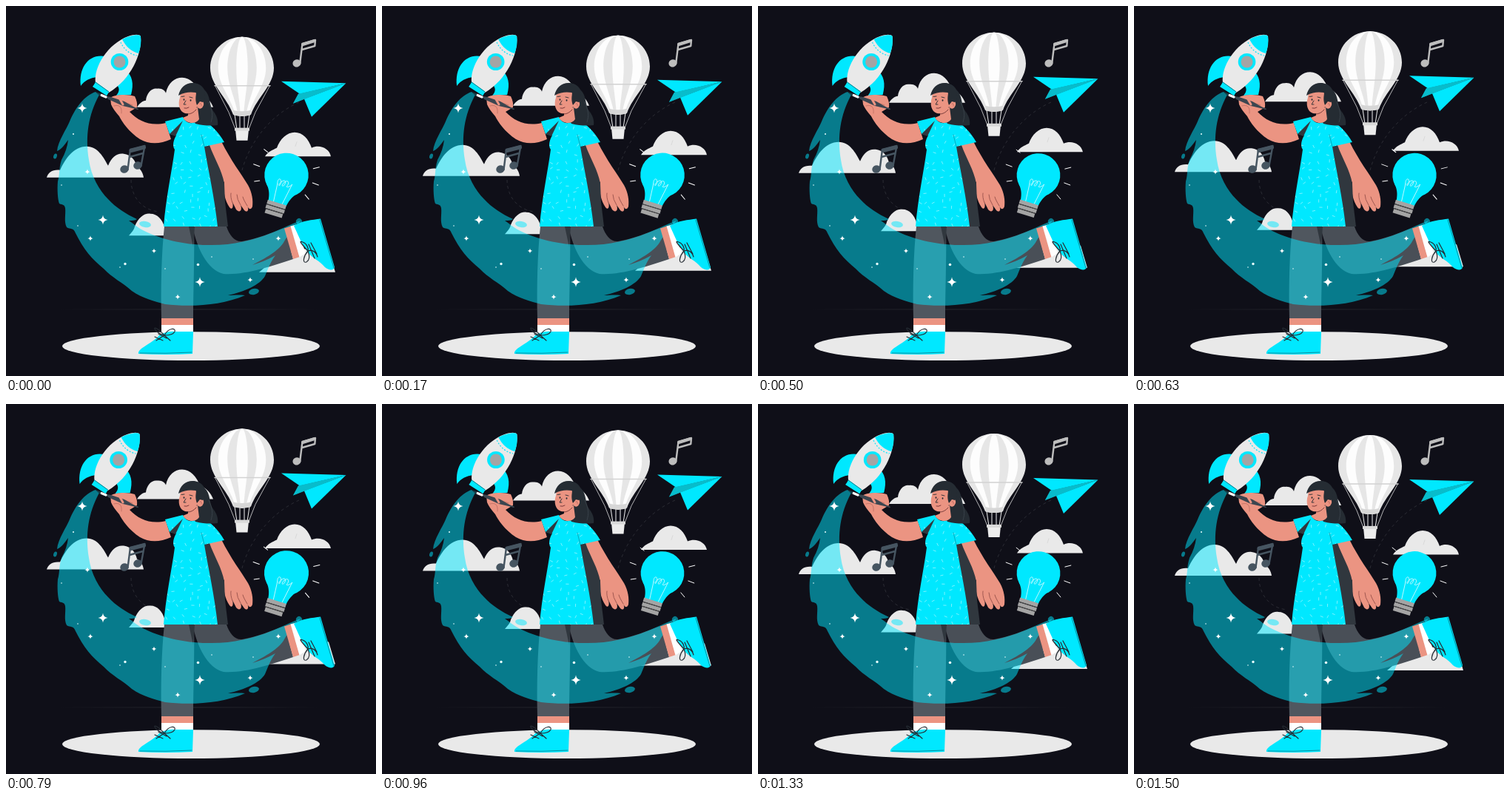
An HTML page with a canvas for the animation above (1.54 s loop, 500x500 px).

```html
<!DOCTYPE html>
<html lang="en">
<head>
<meta charset="utf-8">
<title>Painting a dream</title>
<style>
html, body { margin: 0; width: 100%; height: 100%; overflow: hidden; background: #0f0f18; }
canvas { display: block; width: 100vw; height: 100vh; }
</style>
</head>
<body>
<canvas id="stage" width="500" height="500"></canvas>
<script>
const canvas = document.getElementById('stage');
const ctx = canvas.getContext('2d');
const LOOP = 1540;
const CYAN = '#00e8ff', PALE = '#e9e9e9', SKIN = '#eb9482', INK = '#252c33', SLATE = '#465561', SHADE = '#30373e';

function fill(path, color) {
  ctx.fillStyle = color;
  ctx.fill(new Path2D(path));
}

function line(path, color, width = 1, dash = []) {
  ctx.strokeStyle = color;
  ctx.lineWidth = width;
  ctx.lineCap = dash.length ? 'butt' : 'round';
  ctx.lineJoin = 'round';
  ctx.setLineDash(dash);
  ctx.stroke(new Path2D(path));
}

function oval(x, y, rx, ry, color, angle = 0) {
  ctx.beginPath();
  ctx.ellipse(x, y, rx, ry, angle, 0, Math.PI * 2);
  ctx.fillStyle = color;
  ctx.fill();
}

function shifted(x, y, draw) {
  ctx.save();
  ctx.translate(x, y);
  draw();
  ctx.restore();
}

// Smoothly eased value through [time, value] keys.
function keyed(keys, t) {
  const i = Math.max(1, keys.findIndex(k => k[0] >= t));
  const [t0, a] = keys[i - 1], [t1, b] = keys[i];
  const u = (t - t0) / (t1 - t0);
  return a + (b - a) * u * u * (3 - 2 * u);
}

const rocketSway = [[0, 0], [330, 0.3], [500, -0.4], [760, -1.5], [960, 0.4], [1170, 2], [1500, 0.2], [1540, 0]];
const bulbPulse = [[0, 1.008], [330, 1.012], [500, 0.995], [790, 1.02], [960, 0.995], [1170, 0.995], [1500, 0.998], [1540, 1.008]];

let seed = 11;
function random() {
  seed = (seed * 16807) % 2147483647;
  return seed / 2147483647;
}
const flecks = [];
for (let y = 162; y < 298; y += 11) {
  for (let x = 214; x < 292; x += 11) {
    flecks.push([x + random() * 7, y + random() * 7, random() * Math.PI]);
  }
}

function backdrop() {
  ctx.fillStyle = '#0f0f18';
  ctx.fillRect(0, 0, 500, 500);
  const glow = ctx.createLinearGradient(70, 0, 425, 0);
  glow.addColorStop(0, '#0f0f18');
  glow.addColorStop(0.5, '#292a31');
  glow.addColorStop(1, '#0f0f18');
  ctx.fillStyle = glow;
  ctx.fillRect(70, 409.5, 355, 1);
  oval(250, 459.6, 174, 19.4, PALE);
  line('M319 222C328 188 354 149 396 130', '#2b2c34', 1, [4, 4]);
  line('M169 235C169 257 183 276 207 278', '#2b2c34', 1, [4, 4]);
}

function clouds() {
  fill('M177 137C180 132 185 128 189 128C190 118 197 111 204 112C211 111 215 115 216 118C219 104 228 97 238 97C249 97 258 107 262 119C270 121 277 129 280 137Z', PALE);
  fill('M55 232C57 225 63 221 73 222C80 207 91 190 109 190C124 190 132 205 138 216C143 204 150 199 159 200C169 201 175 209 177 218C182 220 185 226 186 232Z', PALE);
  fill('M166 310.5C172 304 173 302 174 298C179 286 187 280 195 281C205 281 211 289 214 298L219 310.5Z', PALE);
  fill('M342 360C350 353 357 348 365 343L390 328L436 330L445 360Z', PALE);
}

function rightCloud() {
  fill('M350 203.5C354 197 360 195 366 192C370 180 380 171 390 171C401 171 409 180 413 192C424 187 437 193 439 203.5Z', PALE);
  line('M391 190L393 184', '#d5d5d5', 0.8);
}

function balloon() {
  const envelope = 'M0 0C24 0 43 19 43 42C43 65 20 82 12 105Q0 109 -12 105C-20 82 -43 65 -43 42C-43 19 -24 0 0 0Z';
  shifted(319, 42, () => {
    [[1, '#e6e6e6'], [0.75, '#fdfdfd'], [0.46, '#e6e6e6'], [0.18, '#fdfdfd']].forEach(([sx, color]) => {
      ctx.save();
      ctx.scale(sx, 1);
      fill(envelope, color);
      ctx.restore();
    });
    line('M-37 66H38', '#d2d2d2', 1.5);
    line('M-36 67L-18 102L-9 125M37 67L18 102L9 125', '#dedede', 0.8);
    line('M-10 105L-7 125M10 105L7 125M-3 106V125M3 106V125', '#f2f2f2', 1);
    fill('M-12 99Q0 102 12 99L11 106Q0 108 -11 106Z', '#d7d7d7');
    fill('M-9 125H9L7.5 140H-7.5Z', '#ececec');
    fill('M-10 123H10V127H-10Z', '#d9d9d9');
  });
}

function notes() {
  oval(393, 77.3, 5.6, 5.1, '#bdbdbd', -0.3);
  line('M397.3 77L400.5 51L418 46L417.3 54L400 59', '#bdbdbd', 2.4);
  line('M401 52L417 47', '#bdbdbd', 4);
  oval(160, 220.5, 5.8, 5.2, SLATE, -0.3);
  oval(178, 215.5, 5.8, 5.2, SLATE, -0.3);
  line('M164.5 221L168 194L187.5 189L182.5 216M167 204L185 199', SLATE, 2.4);
  line('M169 195.5L186.5 191', SLATE, 5);
}

function plane() {
  fill('M388 132L459.5 104.5L395 119Z', '#0794a3');
  fill('M372 102L459.5 104.5L397 119Z', CYAN);
  fill('M388 132L395 119L459.5 104.5L403 126Z', '#08bccb');
  fill('M403 126L459.5 104.5L413 150Z', CYAN);
}

function bulb(scale) {
  ctx.save();
  ctx.translate(379, 240);
  ctx.scale(scale, scale);
  ctx.translate(-379, -240);
  line('M335 214L343 217M336 237L343 236M349 194L354 198M415 220L423 218M414 239L422 242M404 255L409 261', '#fff', 1);
  ctx.translate(379, 228.5);
  ctx.rotate(0.3);
  fill('M-22 19C-15 27 -14 33 -13 40H12C13 33 15 27 21 19.5Z', CYAN);
  oval(0, 0, 29.5, 29.5, CYAN);
  line('M-6 40L-8 15M6 39L11 10M-8 15C-11 7 -5 5 -4 12C-4 19 -8 17 -4 11C0 5 3 9 1 14C-1 18 -3 14 1 9C5 5 7 10 5 14C4 17 9 14 11 10', '#d9fbff', 0.8);
  fill('M-14 39H12V44.5H-14ZM-14 45.5H12V50.5H-14ZM-13 51.5H11V57H-13Z', '#a4a4a4');
  line('M-13 45H11M-13 51H11', '#4d4d4d', 1);
  ctx.restore();
}

function legs() {
  fill('M247 298H298C302 310 309 319 319 318C339 315 359 306 377 300L388 342C358 352 322 364 294 362C272 357 258 327 252 298Z', '#494f57');
  fill('M214 298H254C255 340 253 382 253 422H210C209 382 210 335 214 298Z', '#50575f');
  fill('M247 298H255L253 326Z', SHADE);
}

function swoosh() {
  ctx.globalAlpha = 0.5;
  fill('M121 116C106 121 94 137 86 156C82 166 70 183 69 196C75 194 80 186 84 181C83 190 80 199 75 208C71 221 73 227 70 237C69 248 70 262 72 267C77 269 79 268 80 273C81 282 78 291 82 299C87 302 91 299 94 307C105 329 116 342 132 355C143 367 158 374 170 385C184 395 201 399 215 403C249 407 291 405 323 391C314 390 307 391 300 391C322 386 343 377 350 365C354 356 357 346 364 337C353 343 343 347 333 350C350 341 369 331 376 318C382 307 391 300 398 290C382 296 371 302 358 307C332 317 304 324 272 323C240 323 206 314 185 303C176 298 172 294 166 290C171 290 174 290 177 288C162 281 148 272 138 261C126 249 115 230 112 208C107 176 111 148 126 120Z', CYAN);
  oval(66.5, 203, 2.3, 3.6, CYAN, 0.3);
  oval(188, 295, 8, 4, CYAN, 0.15);
  oval(335, 386, 7, 4, CYAN, -0.2);
  oval(396, 291, 4, 4, CYAN, -0.7);
  ctx.globalAlpha = 1;
}

function stars() {
  const sparkles = [[103, 138, 6.5], [110, 224, 3.8], [131, 289, 6.5], [114, 314, 3.8], [200, 331, 3.4], [262, 373, 6.7], [232, 393, 3.8], [330, 370, 3.8], [368, 314, 3.8]];
  sparkles.forEach(([x, y, r]) => {
    const c = r * 0.1;
    shifted(x, y, () => fill(`M0 ${-r}Q${c} ${-c} ${r} 0Q${c} ${c} 0 ${r}Q${-c} ${c} ${-r} 0Q${-c} ${-c} 0 ${-r}Z`, '#fff'));
  });
  const dots = [[91, 173, 1], [75, 242, 0.8], [97, 297, 0.8], [161, 348.5, 1.7], [154, 353, 0.8], [215, 355, 0.8], [259.5, 349.5, 1.8], [278, 339, 0.8], [334, 342, 0.8]];
  dots.forEach(([x, y, r]) => oval(x, y, r, r, '#e8ffff'));
}

function shoes() {
  fill('M210 422H253V431.5H210Z', SKIN);
  fill('M210 431H253V441H210Z', '#fff');
  fill('M179 470C178 462 197 457 207 445Q218 439 228 440H253L252 470Q216 472 179 470Z', CYAN);
  line('M181 469Q216 470 251 468', '#087987', 0.8);
  line('M214 445C204 434 198 433 202 438C205 442 210 444 214 445C220 434 230 435 228 440C226 444 220 445 214 445M214 445L203 452M214 445L222 452M201 447L212 452M206 443L217 449', INK, 1.2);
  fill('M376 300.5L385 297.5L397 339L388 342Z', SKIN);
  fill('M384.5 297.5L392 295.5L405 334L396.5 339.5Z', '#fff');
  fill('M389 297C400 290 414 289 425 287.5L444 353C443 358 436 357 431 353C424 344 414 341 408 333L399 319Z', CYAN);
  line('M424 289L443 354', '#087987', 0.8);
  line('M407 330C397 319 396 317 401 319C407 321 409 328 408 331C402 338 400 348 406 346C411 343 410 336 408 331M408 331C414 329 419 332 421 339M409 322L417 341M412 320L420 335', INK, 1.2);
}

function arms() {
  fill('M141 124C147 119 166 119 174 122Q178 130 177 137L167 143C179 156 196 163 216 158L223 180C208 187 193 187 181 180C166 170 157 157 153 149C148 143 144 138 142 133Z', SKIN);
  line('M146 135C153 133 157 136 156 145M160 130L171 134', '#bd6c61', 0.8);
  fill('M272 187L291 183C304 209 318 227 327 242C333 253 334 263 333 271C331 276 328 275 326 270C329 276 326 280 322 276L317 269C320 277 315 280 311 275L306 265C308 273 305 276 302 272C296 263 293 251 295 239C287 222 279 205 272 187Z', SKIN);
  line('M306 266Q303 258 304 253M317 269Q312 261 312 255M326 270Q321 262 320 258', '#9f5750', 1);
}

function dress() {
  const shape = 'M215 156L239 150C244 161 256 160 261 152C274 157 286 168 295 184L268 190C273 220 282 260 286 298H213C216 260 224 224 228 194C224 188 227 180 230 175L221 173Z';
  fill('M267 188L275 188C281 205 292 222 295 240L296 265L300 298H284Z', SHADE);
  fill(shape, CYAN);
  ctx.save();
  ctx.clip(new Path2D(shape));
  flecks.forEach(([x, y, a]) => {
    const dx = Math.cos(a) * 1.7, dy = Math.sin(a) * 1.7;
    line(`M${x - dx} ${y - dy}L${x + dx} ${y + dy}`, '#b4f7ff', 0.7);
  });
  ctx.restore();
  fill('M221 173L239 155L229 176Z', SHADE);
  line('M268 190L264 174', '#079baa', 0.8);
}

function head() {
  fill('M241 109C248 102 263 103 268 113C277 121 274 134 280 142C285 148 287 155 286 161C278 162 267 162 256 159L250 149Z', INK);
  fill('M246 141L259 137L261 153C256 161 244 159 239 151L246 148Z', SKIN);
  fill('M236 115C244 111 258 111 259 124L262 129C266 126 269 132 266 136C264 140 260 139 258 136C256 143 250 146 242 145C234 143 232 132 235 124Z', SKIN);
  fill('M233 121C235 111 242 104 252 104C265 104 270 114 269 125L266 130L262 129L258 134C255 126 257 121 257 117C249 116 242 116 233 121Z', INK);
  oval(240.5, 126.5, 0.9, 1.3, INK);
  oval(249.5, 127.5, 0.9, 1.3, INK);
  line('M237 122.5L241 122M248 123L252 124M243 128L240 133H243', INK, 0.9);
  line('M241 138Q244 139 247 137', '#6f3034', 0.9);
  line('M262 132Q265 131 264 135', '#ae6159', 0.7);
  line('M246 146Q252 146 257 140', '#7c3e3c', 1);
  line('M274 130C279 141 280 148 277 157', '#414a52', 0.7);
}

function rocket() {
  fill('M134 68C112 64 98 83 101 108C106 101 113 97 124 96Z', CYAN);
  fill('M161 86C171 94 173 105 169 120L149 121C154 115 154 110 148 105Z', CYAN);
  fill('M122 102L140 115L136 121L117 109Z', CYAN);
  fill('M121 104C118 82 138 51 165 41C173 38 181 38 182 41C184 65 169 99 139 117Z', PALE);
  fill('M157 45C165 40 181 37 182 41C183 49 182 57 179 64C170 62 162 55 157 45Z', CYAN);
  line('M155 49C159 59 169 66 177 67', CYAN, 1.1, [2, 2]);
  fill('M121 102.5L139 115.5L136 121L118 109Z', CYAN);
  line('M121 103L139 116', '#087f8b', 1);
  oval(153.5, 75.5, 11.8, 11.5, CYAN);
  oval(153.5, 75.5, 8, 8, '#a4a4a4');
}

function brush() {
  fill('M136 122L142 123L160 129L179 140L158 135L138 126Z', '#3c4650');
  line('M136 123.5L178 139.3', '#3c4650', 1.6);
  line('M129 120.5L135 123', '#fff', 3.2);
  fill('M121 116L128 118.5L127 122Z', '#163f48');
  line('M154 126L158 133', SKIN, 3);
}

function render(t) {
  // The floating layer rises and sinks at constant speed, 9 px in all.
  const phase = (t + 30) % LOOP / LOOP;
  const bob = -9 * (1 - Math.abs(1 - 2 * phase));
  const size = Math.min(innerWidth, innerHeight) * devicePixelRatio;
  if (canvas.width !== Math.round(size)) canvas.width = canvas.height = Math.round(size) || 500;
  ctx.setTransform(canvas.width / 500, 0, 0, canvas.height / 500, 0, 0);
  backdrop();
  shifted(0, bob, () => { clouds(); rightCloud(); balloon(); plane(); });
  notes();
  bulb(keyed(bulbPulse, t));
  legs();
  swoosh();
  stars();
  shoes();
  shifted(keyed(rocketSway, t), 0, rocket);
  arms();
  dress();
  head();
  brush();
}

const start = performance.now();
function tick() {
  render((performance.now() - start) % LOOP);
  requestAnimationFrame(tick);
}
tick();
</script>
</body>
</html>
```
